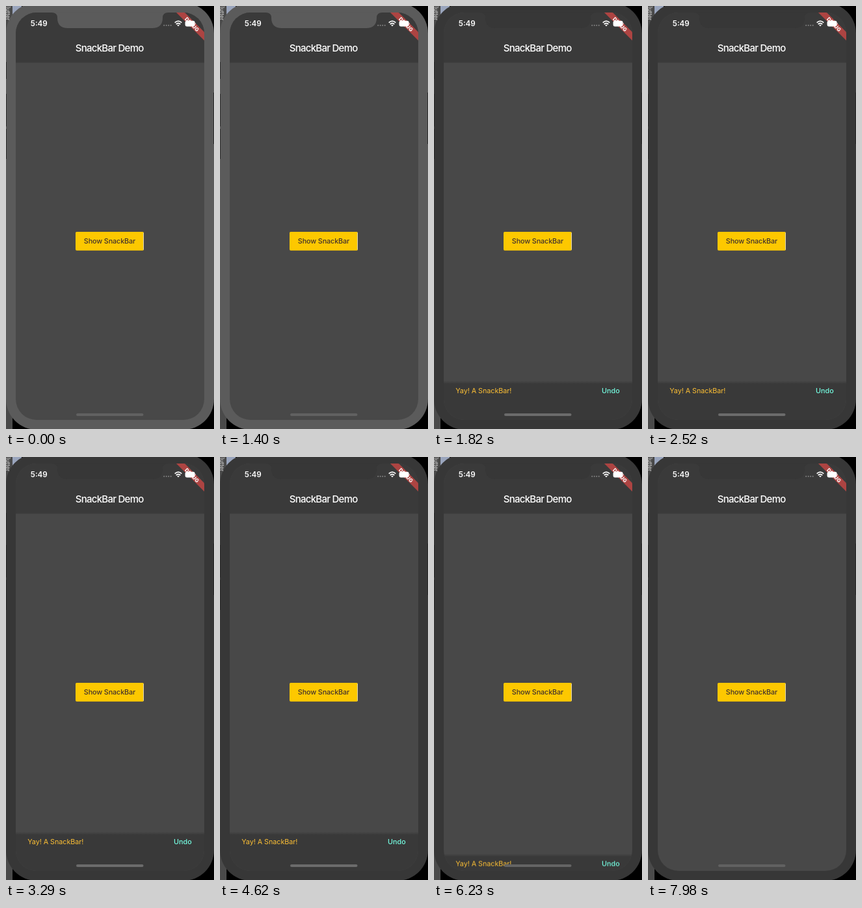
Animation of 320 by 650 pixels, one loop 8000 ms. Source, as an HTML page:

```html
<!DOCTYPE html>
<html lang="en">
<head>
<meta charset="utf-8">
<title>SnackBar Demo</title>
<style>
  html, body { margin: 0; width: 100%; height: 100%; overflow: hidden; background: #000; }
  svg { display: block; width: 100vw; height: 100vh; }
  text { font-family: Inter, Roboto, sans-serif; font-size: 10.8px; font-weight: 500; }
  .middle { text-anchor: middle; }
  .title { font-size: 15px; letter-spacing: -.75px; fill: #fff; }
  .clock { font-size: 11.6px; font-weight: 600; fill: #fff; }
  .debug { font-size: 7.8px; font-weight: 800; fill: #fff; }
  .desktop { font-size: 8.5px; fill: #c4c4c4; }
</style>
</head>
<body>
<svg viewBox="0 0 320 650" preserveAspectRatio="none">
  <defs>
    <clipPath id="screen"><rect x="15" y="10" width="290" height="626" rx="32"/></clipPath>
    <linearGradient id="shadeDown" x2="0" y2="1">
      <stop stop-color="#383838"/><stop offset="1" stop-color="#383838" stop-opacity="0"/>
    </linearGradient>
    <linearGradient id="shadeUp" x2="0" y2="1">
      <stop stop-color="#383838" stop-opacity="0"/><stop offset="1" stop-color="#383838"/>
    </linearGradient>
  </defs>

  <!-- desktop behind the phone -->
  <rect width="320" height="650" fill="#000"/>
  <rect width="10" height="650" fill="#4a4a4a"/>
  <rect x="10" width="14" height="14" fill="#9aa5bd"/>
  <text class="desktop" transform="translate(0 -4) rotate(90)">Flutter</text>

  <rect id="bezel" y="-5" width="320" height="656" rx="47" fill="#5b5b5b"/>
  <path d="M.3 86V112M.3 135V185M.3 189V235M319.6 133V212" stroke="#252525" stroke-width="1"/>

  <g clip-path="url(#screen)">
    <rect x="15" y="10" width="290" height="626" fill="#484848"/>
    <rect x="15" y="10" width="290" height="76" fill="#3a3a3a"/>
    <rect x="15" y="86" width="290" height="2" fill="url(#shadeDown)"/>

    <rect x="107" y="347" width="105" height="28.7" rx="1.8" fill="#fdc800"/>
    <path d="M211.5 348.5V374.5" stroke="#e6d9b4" stroke-width="1"/>
    <text class="middle" x="159.5" y="365" fill="#43322c" letter-spacing="-.12">Show SnackBar</text>

    <g id="snack">
      <rect x="15" y="576" width="290" height="5" fill="url(#shadeUp)"/>
      <rect x="15" y="581" width="290" height="60" fill="#393939"/>
      <text x="33.3" y="595" fill="#fcbf35" style="font-weight:400" letter-spacing="-.05">Yay! A SnackBar!</text>
      <text x="258" y="595" fill="#74fbe0">Undo</text>
    </g>

    <rect id="home" x="108" y="626" width="103.5" height="4" rx="2" fill="#616161"/>

    <path d="M262 10H275L305 40V53Z" fill="#ad4442"/>
    <text class="debug middle" transform="translate(286 28.2) rotate(45)" y="2.8">DEBUG</text>
  </g>

  <path id="notch" fill="#5b5b5b" d="M70 9.5H250V10Q241 10 241 18Q241 34 225 34H95Q79 34 79 18Q79 10 70 10Z"/>

  <text class="clock" x="37.8" y="31">5:49</text>
  <text class="title middle" x="159.2" y="70">SnackBar Demo</text>
  <path d="M243.2 29.7H256" stroke="#858585" stroke-width="2" stroke-linecap="round" stroke-dasharray="0 3.5"/>
  <g fill="none" stroke="#fff" stroke-width="1.7">
    <path d="M259.7 25.6Q265 20.8 270.3 25.6M261.7 28Q265 25 268.3 28"/>
    <path d="M263.2 29.4Q265 28 266.8 29.4L265 31.2Z" fill="#fff" stroke="none"/>
  </g>
  <rect x="275.6" y="22.8" width="15" height="8.6" rx="2.4" fill="#fff"/>
  <path d="M291.2 25.5Q292.8 27 291.2 28.6Z" fill="#fff"/>
</svg>
<script>
  const LOOP = 8000;
  const FOCUS = 1470;
  const ENTER = [1540, 1790];
  const EXIT = [6066, 6316];

  const start = document.timeline.currentTime ?? 0;
  const play = (id, steps) => {
    const frames = steps.map(([ms, style, easing = 'linear']) => ({ offset: ms / LOOP, easing, ...style }));
    document.getElementById(id).animate(frames, { duration: LOOP, iterations: Infinity }).startTime = start;
  };

  const tint = fill => ({ fill });
  const focus = [
    [0, tint('#5b5b5b')], [FOCUS, tint('#5b5b5b')],
    [FOCUS, tint('#373737')], [LOOP, tint('#373737')]
  ];

  const home = [
    [0, tint('#616161')], [ENTER[0], tint('#616161')],
    [ENTER[1], tint('#6b6b6b')], [EXIT[0], tint('#6b6b6b')],
    [EXIT[1], tint('#616161')], [LOOP, tint('#616161')]
  ];

  const slide = y => ({ transform: `translateY(${y}px)` });
  const snack = [
    [0, slide(64)],
    [ENTER[0], slide(64), 'cubic-bezier(.4,0,.2,1)'],
    [ENTER[1], slide(0)],
    [EXIT[0], slide(0), 'cubic-bezier(.8,0,.6,1)'],
    [EXIT[1], slide(64)],
    [LOOP, slide(64)]
  ];

  play('bezel', focus);
  play('notch', focus);
  play('home', home);
  play('snack', snack);
</script>
</body>
</html>
```
